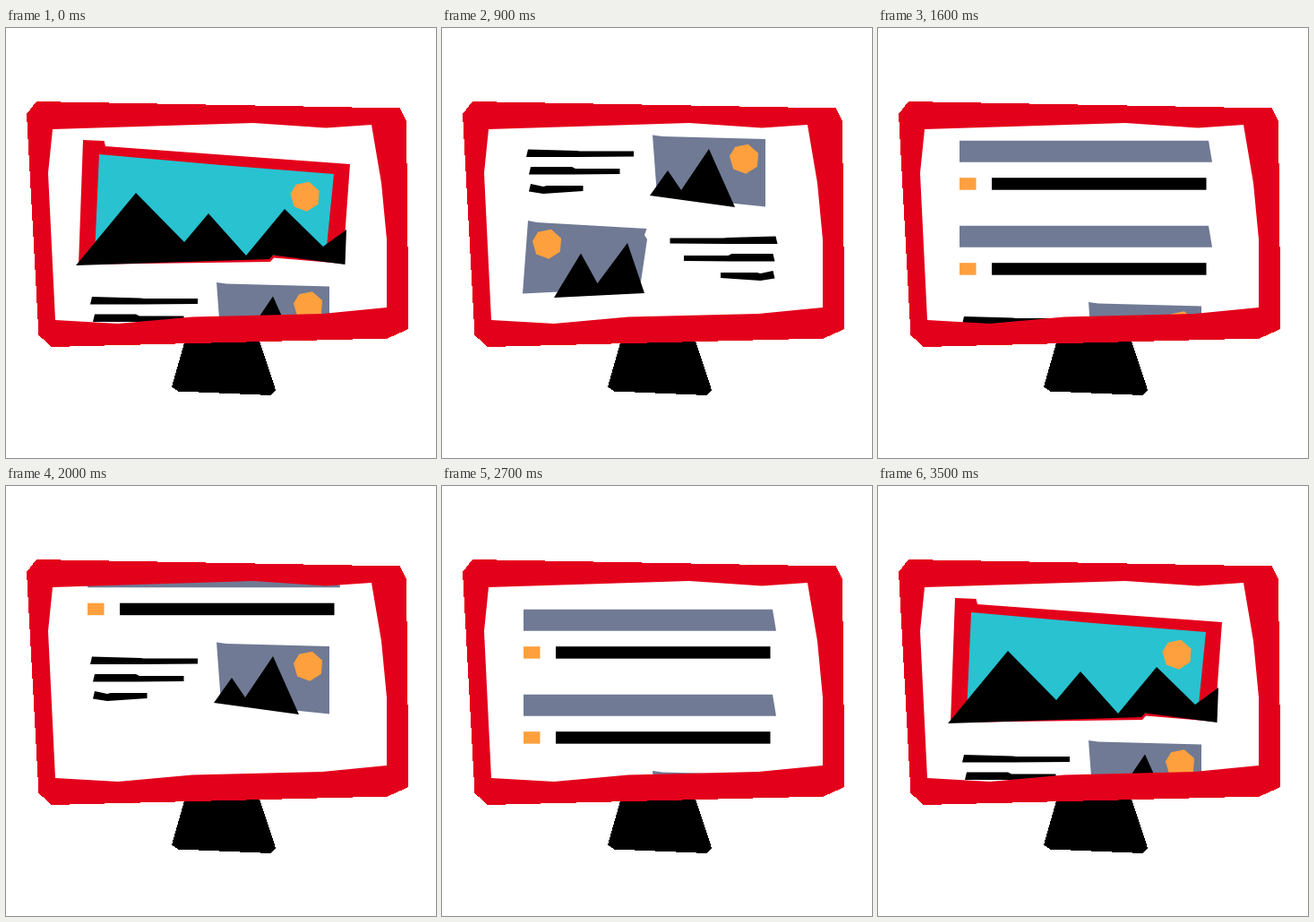
Recreate the animation shown at these times as an HTML page with a canvas. Size 480 px wide and 480 px high, loop 4000 ms.

```html
<!DOCTYPE html>
<html lang="en">
<head>
<meta charset="utf-8">
<title>Scrolling page</title>
<style>
html, body { margin: 0; width: 100%; height: 100%; overflow: hidden; background: #fff; }
svg, canvas { position: absolute; left: 0; top: 0; width: 480px; height: 480px; }
</style>
</head>
<body>
<svg viewBox="0 0 480 480" shape-rendering="crispEdges">
  <polygon points="200,348 282.5,348 301,404 295.5,410 192,405.5 185,400.5"/>
  <polygon fill="#e3001b" points="34,82 440,89.5 447,104 449.5,336 426,346.5 51,356 36.5,343 23,96"/>
</svg>
<canvas id="stage" width="480" height="480"></canvas>
<script>
const ctx = document.getElementById('stage').getContext('2d');
const RED = '#e3001b', GREY = '#707a94', TEAL = '#28c2d0', ORANGE = '#ffa03e', BLACK = '#000';
const LOOP = 4000, TICK = 100, SCROLL = 526;

// Part of the monitor that the canvas covers, and the opening in it.
const VIEW = { x: 42, y: 98, w: 393, h: 240 };
const OPENING = '52,113 276,106 357,111.5 408,108 419,173 425,236 425,312 353,319 208,322.5 125,330 55,326 47,162';

const parse = text => text.split(' ').map(p => p.split(',').map(Number));

function trace(points) {
  points.forEach(([x, y], i) => i ? ctx.lineTo(x, y) : ctx.moveTo(x, y));
  ctx.closePath();
}

function poly(color, points) {
  ctx.fillStyle = color;
  ctx.beginPath();
  trace(typeof points === 'string' ? parse(points) : points);
  ctx.fill();
}

function rect(color, x, y, w, h) {
  ctx.fillStyle = color;
  ctx.fillRect(x, y, w, h);
}

function at(x, y, draw, flip = 1) {
  ctx.save();
  ctx.translate(x, y);
  ctx.scale(flip, 1);
  draw();
  ctx.restore();
}

// Seven-sided disc, cut a little unevenly.
function sun(cx, cy) {
  poly(ORANGE, Array.from({ length: 7 }, (_, i) => {
    const a = (53 * i - 128) * Math.PI / 180;
    return [cx + 16.8 * Math.cos(a), cy + 16.8 * Math.sin(a)];
  }));
}

// Line of text as a paper strip with one knee in it.
function strip(x, y, w, knee, dip, sag) {
  poly(BLACK, [
    [x + 2, y], [x + knee, y + dip], [x + knee + 4, y + 2], [x + w, y + 2],
    [x + w, y + 8], [x + knee, y + 8.5 + sag], [x, y + 8.5]
  ]);
}

function lines() {
  strip(94, 135.5, 120, 56, 1.5, 0);
  strip(97, 155, 101.5, 48, 0, 0);
  strip(97, 174, 60.5, 16, 3, 2.5);
}

function hero() {
  poly(RED, '86,125 109.5,126 111,132 384,152 376,263 299,256.5 295,261 81,264');
  poly(TEAL, '104,141 240,153 366,163 357,254 99,254');
  sun(334, 188);
  poly(BLACK, '78,265 145,184 199,239 226,207 268,254 311,202 354,244 380,225 378.5,264 298,253.5 294,258');
}

function textLeft() {
  lines();
  poly(GREY, '235,119.5 246,121 361,124 361,199.5 240,187');
  sun(337.5, 146);
  poly(BLACK, '232,187 252,159 267,181 298,135 327,200');
}

function textRight() {
  at(468.5, 97, lines, -1);
  poly(GREY, '96,215 106,217 228.5,224 226,231 229,236 221,290 90,296.5');
  sun(117.5, 241);
  poly(BLACK, '125,301 155,251.5 173.5,285 207,240 226,296');
}

function heading() {
  poly(GREY, '91,126 369,126 373,150 91,150');
  rect(ORANGE, 91, 167.5, 18.5, 13.5);
  rect(BLACK, 127, 167.5, 239.5, 13.5);
}

function page() {
  hero();
  at(0, 164.4, textLeft);
  at(0, 164.4, textRight);
  at(0, 394.2, heading);
  at(0, 489.2, heading);
  at(0, 581, textLeft);
}

// Down in 16 even ticks, back up in 11.
function scrollAt(t) {
  const ticks = start => Math.floor((t - start) / TICK) + 1;
  if (t < 500) return 0;
  if (t < 2500) return SCROLL * Math.min(ticks(500) / 16, 1);
  return SCROLL * Math.max(1 - ticks(2500) / 11, 0);
}

function render(t) {
  const { x, y, w, h } = VIEW;
  ctx.save();
  ctx.beginPath();
  ctx.rect(x, y, w, h);
  ctx.clip();
  rect('#fff', x, y, w, h);
  at(0, -scrollAt(t), page);
  ctx.fillStyle = RED;
  ctx.beginPath();
  ctx.rect(x, y, w, h);
  trace(parse(OPENING));
  ctx.fill('evenodd');
  ctx.restore();
}

const start = performance.now();
function loop() {
  render((performance.now() - start) % LOOP);
  requestAnimationFrame(loop);
}
loop();
</script>
</body>
</html>
```
